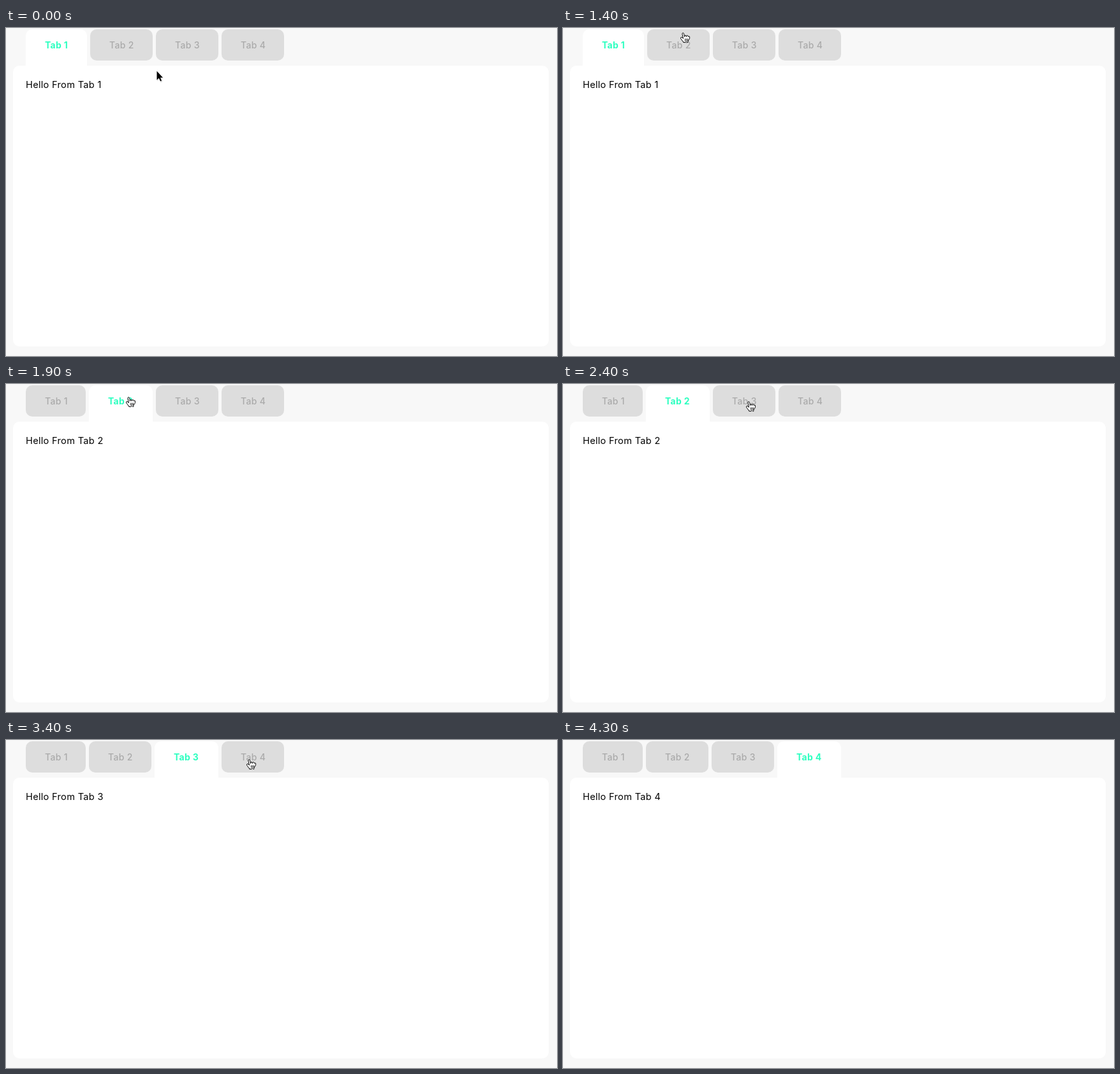
An HTML page that plays this animation: 864 by 514 pixels, repeating every 4700 ms.

```html
<!DOCTYPE html>
<html lang="en">
<head>
<meta charset="utf-8">
<title>Tabs</title>
<style>
  html, body { margin: 0; width: 100%; height: 100%; overflow: hidden; background: #f8f8f8; }
  body { position: relative; font: 400 14px Inter, sans-serif; letter-spacing: .3px; color: #000; }
  .tab {
    position: absolute; top: 2px; height: 49px; box-sizing: border-box; padding-left: 30px;
    border-radius: 10px; background: #ddd; color: #aaa;
    font-weight: 500; line-height: 50px; white-space: nowrap;
  }
  .tab.active { height: 57px; border-radius: 10px 10px 0 0; background: #fff; color: #2effc0; font-weight: 700; }
  #panel { position: absolute; left: 11px; top: 59px; width: 840px; height: 440px; border-radius: 10px; background: #fff; }
  #message { position: absolute; left: 20px; top: 20px; font-size: 14.6px; line-height: 20px; white-space: nowrap; }
  #pointer { position: absolute; left: 0; top: 0; overflow: visible; }
</style>
</head>
<body>
<div id="panel"><div id="message"></div></div>
<svg id="pointer" width="18" height="20">
  <g id="arrow">
    <path d="M.5 .5V15L4 12L6.2 17.2L8.7 16.1L6.5 11.1H10.5Z" fill="#0003" transform="translate(.5 1)"/>
    <path d="M.5 .5V14.6L3.8 11.6L6 16.6L8.1 15.6L6 10.8H10Z" stroke="#fff" stroke-width="1.2" paint-order="stroke"/>
  </g>
  <g id="hand" stroke="#000" stroke-linejoin="round" stroke-linecap="round">
    <path fill="#fff" d="M3.3 13.4L2.1 11.4L.6 9.5Q.1 7.5 1.9 7.4Q3 7.5 4.5 9.5L3 2.7Q2.8 .6 4.3 .6Q5.3 .7 5.7 2.6L6.5 6.8Q6.3 4.4 8 4.4Q9.3 4.6 9.3 6.7Q9.4 4.6 10.8 4.6Q12.3 4.7 12.4 6.8Q13 5.5 14.4 6.3Q15 8.5 14.1 10.3L11.9 13.6L11.8 15.6H10.6L9.3 14.3L7.9 15.6H4.8L4.6 14.4Z"/>
    <path fill="none" stroke-width=".9" d="M7.6 10V13.3M9.6 10V13.3M11.6 10V13.3"/>
  </g>
</svg>
<script>
const LOOP = 4700, STEP = 100, HIDE_AT = 4300;
const clicks = [0, 1900, 2700, 3700];

// Pointer stops: time, x, y
const stops = [
  [0, 236, 67], [300, 259, 152], [500, 259, 152], [600, 258, 152],
  [900, 258, 152], [1400, 184, 7], [1500, 184, 7], [1700, 188, 20],
  [1900, 188, 20], [2400, 287, 27], [2700, 287, 27], [3200, 377, 30], [LOOP, 377, 30]
];

const byId = id => document.getElementById(id);
const panel = byId('panel'), message = byId('message');
const pointer = byId('pointer'), arrow = byId('arrow'), hand = byId('hand');

const tabs = clicks.map((_, i) => {
  const tab = document.createElement('div');
  tab.textContent = `Tab ${i + 1}`;
  document.body.insertBefore(tab, panel);
  return tab;
});

function showTab(active) {
  let left = 31;
  tabs.forEach((tab, i) => {
    const width = (i ? 98 : 94) + (i === active ? 2 : 0);
    tab.className = i === active ? 'tab active' : 'tab';
    tab.style.left = `${left}px`;
    tab.style.width = `${width}px`;
    left += width + 5;
  });
  message.textContent = `Hello From Tab ${active + 1}`;
}

function pointerAt(time) {
  const next = stops.findIndex(stop => stop[0] > time);
  const [t0, x0, y0] = stops[next - 1];
  const [t1, x1, y1] = stops[next];
  const p = (time - t0) / (t1 - t0);
  const eased = p * p * (3 - 2 * p);
  return [x0 + (x1 - x0) * eased, y0 + (y1 - y0) * eased].map(Math.round);
}

function draw(time) {
  const [x, y] = pointerAt(time);
  const overTabs = y < 51;
  showTab(clicks.filter(click => click <= time).length - 1);
  pointer.style.transform = `translate(${x}px, ${y}px)`;
  pointer.style.display = time < HIDE_AT ? '' : 'none';
  arrow.style.display = overTabs ? 'none' : '';
  hand.style.display = overTabs ? '' : 'none';
}

const start = performance.now();
let shown = -1;

function tick() {
  const elapsed = (performance.now() - start) % LOOP;
  const time = Math.floor(elapsed / STEP) * STEP;
  if (time !== shown) draw(shown = time);
  requestAnimationFrame(tick);
}
tick();
</script>
</body>
</html>
```
